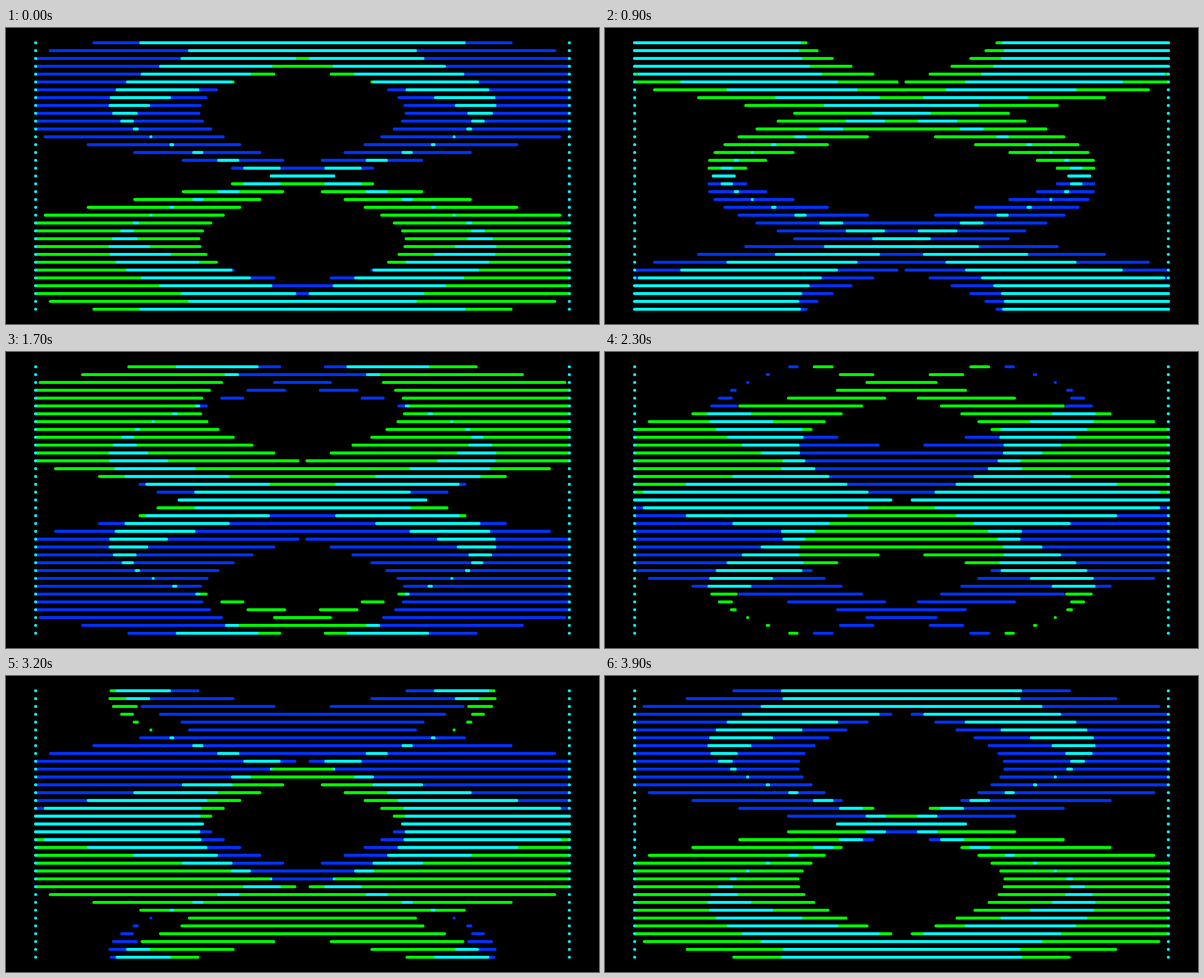
An HTML page with a canvas for the animation above (4000 ms loop, 1058 px wide and 529 px high).

```html
<!DOCTYPE html>
<html lang="en">
<head>
<meta charset="utf-8">
<title>Twisting bars</title>
<style>
  html, body { margin: 0; height: 100%; overflow: hidden; background: #000; }
  canvas { display: block; }
</style>
</head>
<body>
<canvas width="1058" height="529"></canvas>
<script>
const { sin, PI, min, floor } = Math;
const W = 1058, H = 529, R = H / 2, MARGIN = 0.2 * R;
const ROWS = 35, LOOP = 4000, STEP = 100;
const GREEN = '#00ff00', BLUE = '#0033ff', CYAN = '#00ffff';
const ctx = document.querySelector('canvas').getContext('2d');

const rowY = row => 0.1 * R + row * (H - 0.2 * R) / (ROWS - 1);

function bar(x1, x2, y) {
  ctx.moveTo(x1, y);
  ctx.lineTo(x2, y);
}

// One bar per row plus its left-right reflection; flip reverses the row order.
function wave(color, phase, flip) {
  ctx.strokeStyle = color;
  ctx.beginPath();
  for (let row = 0; row < ROWS; row++) {
    const angle = 2 * PI * ((row - 16.5) / ROWS - phase);
    const start = W / 2 + R * (sin(angle) - 0.3);
    const end = min(W - MARGIN, start + R * (1 + sin(angle - PI / 4)));
    const y = rowY(flip ? ROWS - 1 - row : row);
    bar(start, end + 0.01, y);
    bar(W - start, W - end - 0.01, y);
  }
  ctx.stroke();
}

function edgeDots() {
  ctx.fillStyle = CYAN;
  for (let row = 0; row < ROWS; row++) {
    for (const x of [MARGIN, W - MARGIN]) {
      ctx.beginPath();
      ctx.arc(x, rowY(row), 0.01 * R, 0, 2 * PI);
      ctx.fill();
    }
  }
}

function draw(now) {
  const phase = floor(now % LOOP / STEP) * STEP / LOOP;
  ctx.globalCompositeOperation = 'source-over';
  ctx.fillStyle = '#000';
  ctx.fillRect(0, 0, W, H);
  ctx.globalCompositeOperation = 'lighten';
  ctx.lineWidth = 0.02 * R;
  ctx.lineCap = 'round';
  wave(GREEN, phase, false);
  wave(BLUE, phase, true);
  edgeDots();
}

const began = performance.now();
function tick() {
  draw(performance.now() - began);
  requestAnimationFrame(tick);
}
tick();
</script>
</body>
</html>
```
